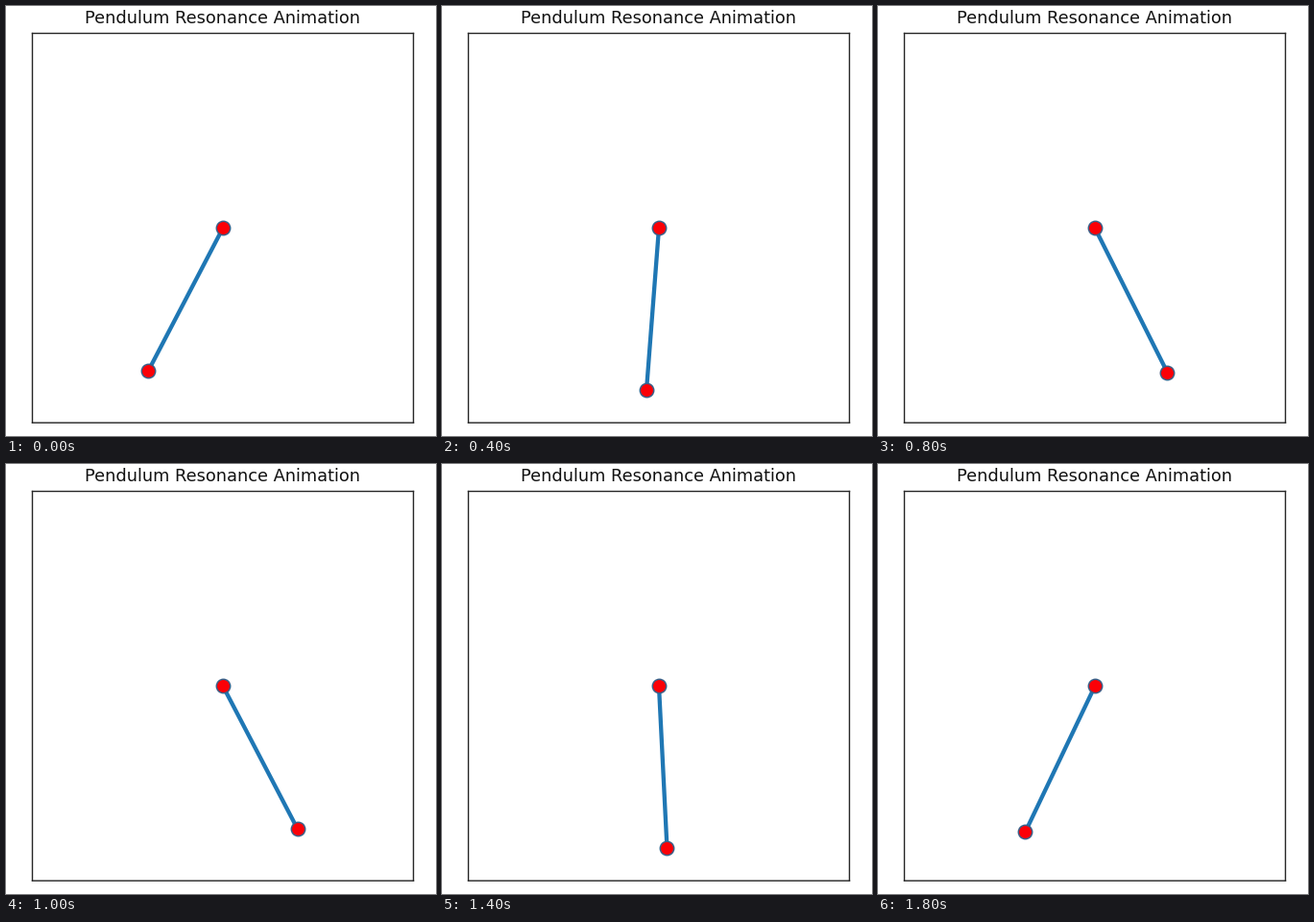
A matplotlib script that plays this animation: 448 px wide and 448 px high, repeating every 1.9 s.

```python
import numpy as np
import matplotlib.pyplot as plt
from matplotlib.animation import FuncAnimation

SIZE, DPI = 448, 64
FRAMES, INTERVAL = 19, 100
LEFT, RIGHT, TOP, BOTTOM = 27.5, 424.5, 28.5, 434.2
SWING = np.radians(29)

# Swing phase in degrees at a few frames; the pace is slightly uneven.
KEY_FRAMES = [0, 4, 8, 12, 14, 16, 18]
KEY_PHASES = [14.3, 81.1, 159.4, 229.4, 264.2, 299.7, 333.7]


def px(n):
    """Pixels to points."""
    return n * 72 / DPI


fig = plt.figure(figsize=(SIZE / DPI, SIZE / DPI), dpi=DPI, facecolor="white")
ax = fig.add_axes([LEFT / SIZE, 1 - BOTTOM / SIZE,
                   (RIGHT - LEFT) / SIZE, (BOTTOM - TOP) / SIZE])
ax.set(xlim=(-1.2, 1.2), ylim=(-1.2, 1.2), xticks=[], yticks=[])
for spine in ax.spines.values():
    spine.set(linewidth=px(1.4), edgecolor="#262626", snap=False)

fig.text((LEFT + RIGHT) / 2 / SIZE, 1 - 18 / SIZE,
         "Pendulum Resonance Animation", family="DejaVu Sans",
         size=px(17.75), color="#111111", ha="center", va="baseline")

rod, = ax.plot([], [], "o-", color="#1f77b4", lw=px(4.3),
               markersize=px(14.4), markerfacecolor="#fb0007",
               markeredgecolor="#3a6088", markeredgewidth=px(1.5),
               snap=False)


def update(frame):
    phase = np.radians(np.interp(frame, KEY_FRAMES, KEY_PHASES))
    angle = -SWING * np.cos(phase)
    rod.set_data([0, np.sin(angle)], [0, -np.cos(angle)])
    return rod,


anim = FuncAnimation(fig, update, frames=FRAMES, interval=INTERVAL,
                     repeat=True, repeat_delay=0)
plt.show()
```
